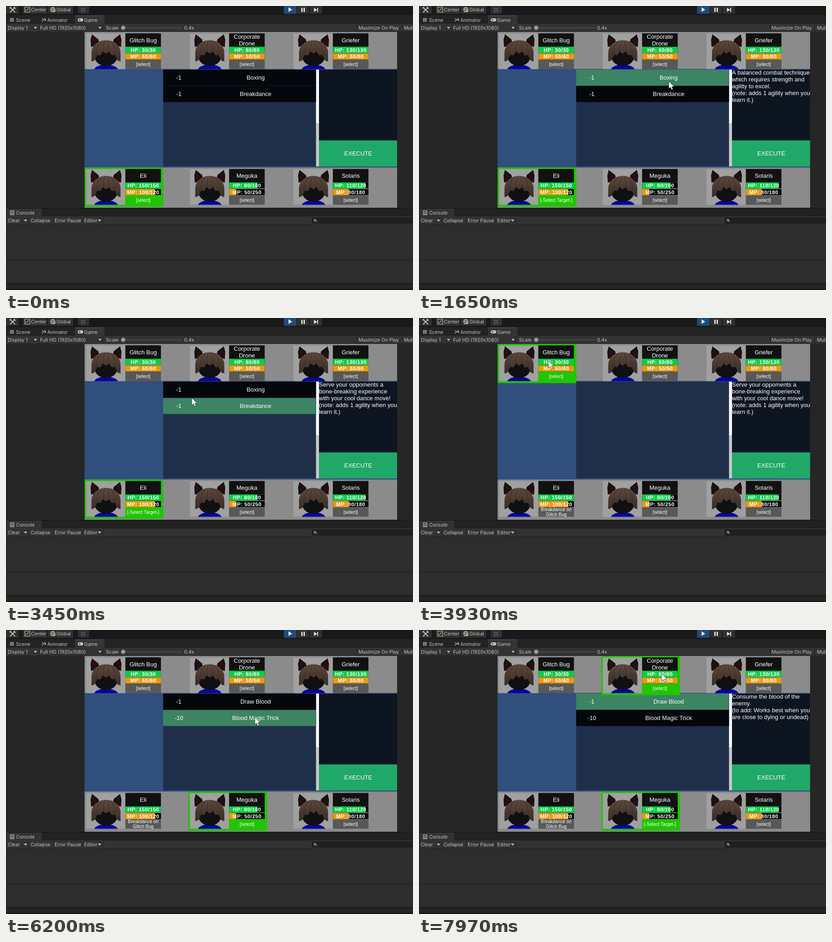
An HTML page with a canvas that plays this animation: 896 by 625 pixels, repeating every 8 s.

```html
<!DOCTYPE html>
<html lang="en">
<head>
<meta charset="utf-8">
<title>Battle menu</title>
<style>
html, body { margin: 0; width: 100%; height: 100%; overflow: hidden; background: #191919; }
canvas { display: block; }
</style>
</head>
<body>
<canvas id="stage" width="896" height="625"></canvas>
<script>
const ctx = document.getElementById('stage').getContext('2d');
const LOOP = 8000;
const STEP = 70;
const GAME_FONT = '"Liberation Sans", Arial, sans-serif';
const UI_FONT = 'Inter, Roboto, sans-serif';
const GREEN = '#20c503';
const INK = '#c2c2c2';

function rect(x, y, w, h, color) {
  ctx.fillStyle = color;
  ctx.fillRect(x, y, w, h);
}

// y is the middle of the capital letters
function text(str, x, y, size, { align = 'center', color = '#fff', weight = 400, font = GAME_FONT } = {}) {
  ctx.font = `${weight} ${size}px ${font}`;
  ctx.textAlign = align;
  ctx.fillStyle = color;
  ctx.fillText(str, x, y + size * 0.36);
}

function label(str, x, y) {
  text(str, x, y, 10.6, { align: 'left', color: INK, font: UI_FONT });
}

function lines(str, x, y, size, step, align) {
  str.split('\n').forEach((s, i) => text(s, x, y + i * step, size, { align }));
}

// centres a block of one or more lines on y
function block(str, x, y, size, step) {
  lines(str, x, y - (str.split('\n').length - 1) * step / 2, size, step);
}

function poly(color, ...pts) {
  ctx.beginPath();
  for (let i = 0; i < pts.length; i += 2) ctx.lineTo(pts[i], pts[i + 1]);
  ctx.closePath();
  ctx.fillStyle = color;
  ctx.fill();
}

function stroke(path, color = INK, width = 1.2) {
  ctx.strokeStyle = color;
  ctx.lineWidth = width;
  ctx.stroke(new Path2D(path));
}

function ellipse(x, y, rx, ry, color) {
  ctx.beginPath();
  ctx.ellipse(x, y, rx, ry, 0, 0, Math.PI * 2);
  ctx.fillStyle = color;
  ctx.fill();
}

function pill(x, y, w, h, r, color) {
  ctx.beginPath();
  ctx.roundRect(x, y, w, h, r);
  ctx.fillStyle = color;
  ctx.fill();
}

const circle = (x, y, r, color) => ellipse(x, y, r, r, color);
const arrowDown = (x, y) => poly(INK, x - 3.5, y - 2, x + 3.5, y - 2, x, y + 2.5);
const dividers = (y, ...xs) => xs.forEach(x => rect(x, y, 1, 17, '#242424'));

// ---- editor window ----
function topBar() {
  rect(0, 0, 896, 20, '#191919');
  const button = (x, w, color = '#303030') => rect(x, 0, w, 17, color);
  button(0, 28);
  button(37, 53);
  button(92, 56);
  button(158, 25);
  button(612, 27, '#1f4c7c');
  button(640, 27);
  button(669, 27);
  poly('#eee', 622, 3, 622, 13, 630, 8);
  rect(650, 4, 3, 9, '#ddd');
  rect(655, 4, 3, 9, '#ddd');
  poly('#ddd', 678, 4, 678, 13, 685, 8.5);
  rect(685, 4, 2, 9, '#ddd');
  stroke('M9 3L20 14M8 5L11 2M20 3L9 14M17 2L21 6', INK, 1.8);
  stroke('M41.5 2.5h11v11h-11z');
  stroke('M44 11L50 5', '#d9a544', 1.6);
  stroke('M98 8a5 5 0 1 0 10 0a5 5 0 1 0-10 0M98 8h10M103 3q-5 5 0 10q5-5 0-10');
  circle(107, 11, 2.2, '#d9a544');
  stroke('M167 3v11M172 3v11M164 6h11M164 11h11', '#666', 1);
  label('Center', 55, 8);
  label('Global', 111, 8);
}

function gameTabs() {
  rect(0, 20, 896, 19, '#232323');
  rect(152, 21, 65, 18, '#343434');
  rect(152, 21, 65, 1, '#376497');
  stroke('M11 26v9M15 26v9M8 28.5h10M8 32.5h10');
  stroke('M79 27l4 3h5M79 34l4-4M85 27l3 3l-3 3');
  pill(158, 27, 12, 7, 3.5, INK);
  stroke('M160 30.5h4M162 28.5v4', '#333', 1);
  label('Scene', 22, 31);
  label('Animator', 91, 31);
  label('Game', 172, 31);

  rect(0, 39, 896, 18, '#333');
  rect(0, 56, 896, 1, '#202020');
  dividers(39, 72, 213, 773, 871);
  label('Display 1', 4, 48);
  arrowDown(65, 48);
  label('Full HD (1920x1080)', 75, 48);
  arrowDown(207, 48);
  label('Scale', 220, 48);
  rect(262, 47.5, 125, 1, '#606060');
  circle(258, 48, 4.7, '#999');
  label('0.4x', 392, 48);
  label('Maximize On Play', 776, 48);
  label('Mute Audio', 876, 48);
  rect(0, 57, 896, 388, '#262626');
}

function consolePanel() {
  rect(0, 444, 896, 19, '#222');
  rect(0, 444, 896, 1.5, '#181818');
  rect(1, 446, 77, 17, '#333');
  stroke('M9.5 450.5h8v9h-8zM11 453h5M11 455.5h5M11 458h5');
  label('Console', 22, 455);
  rect(0, 463, 896, 18, '#333');
  dividers(463, 50, 103, 167, 213);
  label('Clear', 4, 472);
  arrowDown(43, 472);
  label('Collapse', 54, 472);
  label('Error Pause', 107, 472);
  label('Editor', 172, 472);
  arrowDown(206, 472);
  pill(673, 465, 240, 14, 3, '#202020');
  stroke('M678 471a2 2 0 1 0 4 0a2 2 0 1 0-4 0M681.5 472.5L684 475');
  rect(0, 480, 896, 1, '#202020');
  rect(0, 481, 896, 130, '#2d2d2d');
  rect(0, 557.5, 896, 1, '#1b1b1b');
  rect(0, 610.5, 896, 2, '#171717');
  rect(0, 612.5, 896, 10, '#252525');
  rect(0, 622, 896, 3, '#191919');
  rect(0, 20, 1, 592, '#181818');
}

// ---- battle screen ----
const ELI = 3, MEGUKA = 4;
const CARDS = [
  { name: 'Glitch Bug', hp: '30/30', mp: '60/60' },
  { name: 'Corporate\nDrone', hp: '80/80', mp: '50/50' },
  { name: 'Griefer', hp: '130/130', mp: '80/80' },
  { name: 'Eli', hp: '150/150', mp: '100/120' },
  { name: 'Meguka', hp: '80/100', mp: '50/250' },
  { name: 'Solaris', hp: '110/120', mp: '80/180' }
].map((c, i) => ({ ...c, x: 173 + (i % 3) * 228.4, y: i < 3 ? 57 : 355.5 }));
const CARD_W = 173.3, CARD_H = 86.3;

const NOTES = {
  none: '',
  boxing: 'A balanced combat technique\nwhich requires strength and\nagility to excel.\n(note: adds 1 agility when you\nlearn it.)',
  dance: 'Serve your oppoments a\nbone-breaking experience\nwith your cool dance move!\n(note: adds 1 agility when you\nlearn it.)',
  draw: 'Consume the blood of the\nenemy.\n(to add: Works best when you\nare close to dying or undead)'
};

// head centred on x = 0, so the ears can be mirrored
function portrait(x, y) {
  ctx.save();
  ctx.beginPath();
  ctx.rect(x, y, 86.3, 78.7);
  ctx.clip();
  ctx.translate(x + 44, y);
  rect(-44, 0, 87, 79, '#a0a0a0');
  ellipse(0, 80, 26, 11, '#0505a0');
  ellipse(0, 48, 26, 24, '#101013');
  for (const side of [-1, 1]) {
    ctx.save();
    ctx.scale(side, 1);
    poly('#151114', 31, 2, 17, 13, 14, 24, 33, 30, 34, 14);
    poly('#320a0d', 30, 7, 22, 15, 25, 24, 31, 22);
    ctx.restore();
  }

  const hair = ctx.createLinearGradient(0, 14, 0, 66);
  hair.addColorStop(0, '#5f4b40');
  hair.addColorStop(0.5, '#49392f');
  hair.addColorStop(1, '#352a28');
  ctx.beginPath();
  ctx.ellipse(0, 42, 32, 27, 0, Math.PI, 0);
  for (let i = 0; i <= 10; i++) {
    const u = 1 - i / 5;
    ctx.lineTo(32 * u, 40 + 23 * u * u + (i % 2 ? 5 : -1));
  }
  ctx.closePath();
  ctx.fillStyle = hair;
  ctx.fill();
  for (let u = -0.75; u < 1; u += 0.5) {
    stroke(`M${12 * u} 17Q${27 * u} 26 ${29 * u} ${40 + 14 * u * u}`, '#3b2e2a', 1.2);
  }
  ctx.restore();
}

function bar(x, y, tag, value, color) {
  const [now, max] = value.split('/');
  rect(x, y, 78.3, 13, '#050505');
  rect(x, y, 78.3 * now / max, 13, color);
  ctx.letterSpacing = '0.5px';
  text(`${tag}: ${value}`, x + 39.4, y + 6.6, 11.4, { weight: 700 });
  ctx.letterSpacing = '0px';
}

function card({ x, y, name, hp, mp }, lit, status) {
  if (lit) rect(x, y, CARD_W, CARD_H, GREEN);
  portrait(x + 3.2, y + 3.2);
  const ix = x + 89.8, mid = ix + 39.2;
  if (!lit) rect(ix, y + 61, 78.3, 20.8, '#585858');
  rect(ix, y + 3.2, 78.3, 29.5, '#111');
  block(name, mid, y + 18, 13, 14.8);
  bar(ix, y + 33, 'HP', hp, '#08cf45');
  bar(ix, y + 47.5, 'MP', mp, '#ea9a0c');
  block(status, mid, y + 71.6, 10, 11.5);
}

function skillRow(y, cost, name, glow) {
  rect(346, y, 336.5, 35.5, '#04070c');
  ctx.globalAlpha = glow;
  rect(346, y, 336.5, 35.5, '#3c8463');
  ctx.globalAlpha = 1;
  text(cost, 380.5, y + 17.8, 13);
  text(name, 549.5, y + 17.8, 13);
}

const ramp = (t, start, length = 2 * STEP) => Math.min(1, Math.max(0, (t - start) / length));

function skills(t) {
  if (t < 3790) {
    const swap = ramp(t, 2050);
    skillRow(140, '-1', 'Boxing', ramp(t, 1300) - swap);
    skillRow(176, '-1', 'Breakdance', swap);
  } else if (t >= 5590) {
    const swap = ramp(t, 6270);
    skillRow(140, '-1', 'Draw Blood', swap);
    skillRow(176, '-10', 'Blood Magic Trick', ramp(t, 6100, STEP) - swap);
  }
}

function battle(t, mouse) {
  rect(173, 57, 688, 387, '#314f7d');
  rect(173, 57, 688, 81.5, '#8b8b8b');
  rect(173, 355.5, 688, 88.5, '#8b8b8b');
  rect(346, 140, 337, 213, '#1f2f49');
  rect(689, 140, 172, 155.5, '#0d1520');
  rect(689, 296, 172, 57, '#20a869');
  text('EXECUTE', 775.5, 324.5, 13);
  rect(682.5, 140, 6.5, 118, '#fff');
  rect(682.5, 258, 6.5, 95, '#c5c9cc');
  skills(t);

  const note = t < 1650 ? 'none' : t < 2310 ? 'boxing' : t < 5590 ? 'dance' : t < 7090 ? 'none' : 'draw';
  lines(NOTES[note], 689, 146.8, 13, 14.9, 'left');

  const active = t < 3790 ? ELI : t >= 5590 ? MEGUKA : -1;
  CARDS.forEach((c, i) => {
    const over = mouse && mouse.x >= c.x && mouse.x < c.x + CARD_W && mouse.y >= c.y && mouse.y < c.y + CARD_H;
    let status = '[select]';
    if (i === ELI && t >= 3790) status = 'Breakdance on\nGlitch Bug';
    else if ((i === ELI && t >= 1650) || (i === MEGUKA && t >= 7090)) status = '[-Select Target-]';
    card(c, over || i === active, status);
  });
}

// ---- pointer: each move starts where the one before ended ----
const ENTRY = { x: 733, y: 500 };
const MOVES = [
  { from: 390, to: 1150, x: 550, y: 166, bow: 0.8 },
  { from: 1980, to: 2310, x: 557, y: 190 },
  { from: 3240, to: 3730, x: 285, y: 94, bow: 0.25 },
  { from: 4550, to: 5250, x: 540, y: 374 },
  { from: 5320, to: 5390, x: 530, y: 391 },
  { from: 5990, to: 6200, x: 548, y: 192 },
  { from: 6270, to: 6480, x: 550, y: 158 },
  { from: 7760, to: 7970, x: 534, y: 96 }
];

function pointer(t) {
  const i = MOVES.findLastIndex(m => t >= m.from);
  if (i < 0) return null;
  const a = MOVES[i - 1] || ENTRY, b = MOVES[i];
  const count = Math.round((b.to - b.from) / STEP) + 1;
  const step = Math.floor((t - b.from) / (b.to - b.from) * (count - 1) + 0.001);
  const p = Math.min(1, (step + 1) / count);
  const u = p * p * (3 - 2 * p);
  const dx = b.x - a.x, dy = b.y - a.y;
  const side = 2 * u * (1 - u) * (b.bow || 0);
  return { x: Math.round(a.x + dx * u + dy * side), y: Math.round(a.y + dy * u - dx * side) };
}

function drawPointer({ x, y }) {
  ctx.save();
  ctx.translate(x, y);
  poly('#fff', 0, 0, 0, 16, 3.7, 12.7, 6.3, 18.5, 9, 17.3, 6.5, 11.7, 11.8, 11.7);
  ctx.strokeStyle = '#222';
  ctx.lineWidth = 0.7;
  ctx.stroke();
  ctx.restore();
}

function frame(now) {
  const t = now % LOOP;
  const mouse = pointer(t);
  topBar();
  gameTabs();
  consolePanel();
  battle(t, mouse);
  if (mouse) drawPointer(mouse);
}

const begin = performance.now();
function tick() {
  frame(performance.now() - begin);
  requestAnimationFrame(tick);
}
tick();
</script>
</body>
</html>
```
